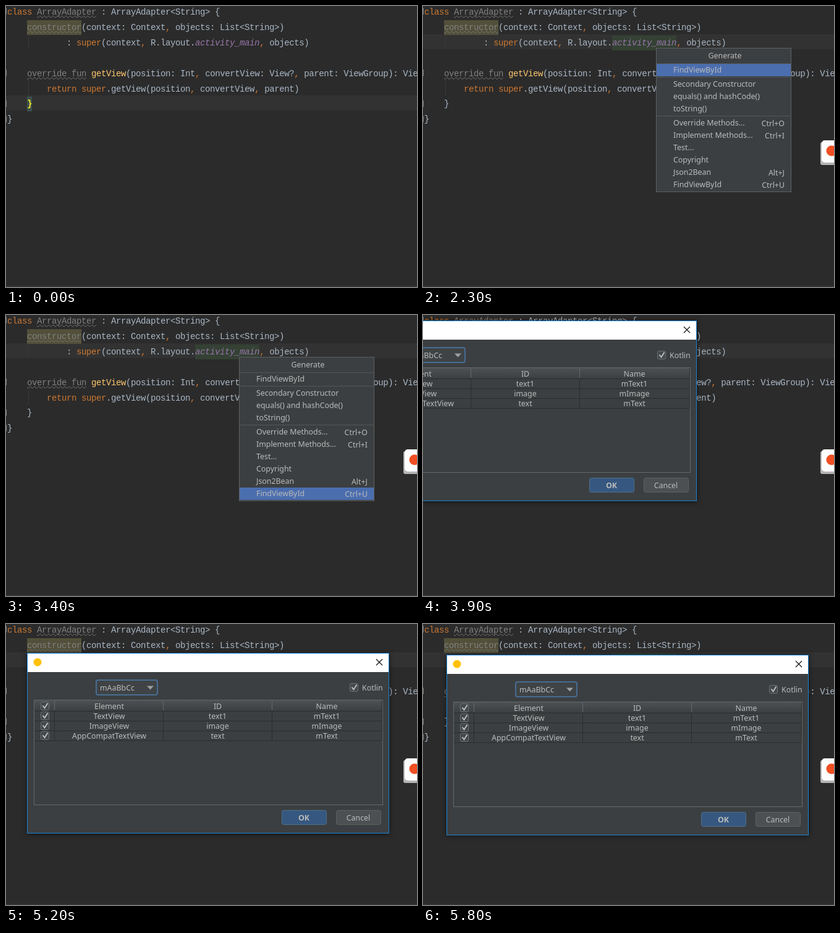
These frames come from a looping animation (665 px wide and 456 px high, 8000 ms). An HTML page:

```html
<!DOCTYPE html>
<html lang="en">
<head>
<meta charset="utf-8">
<title>Generate view bindings</title>
<style>
html, body { margin: 0; width: 665px; height: 456px; overflow: hidden; background: #2b2b2b; }
body { position: relative; }
#row { position: absolute; left: 0; width: 665px; height: 24px; background: #323232; }
pre {
  position: absolute; left: 2px; top: -2px; margin: 0; color: #a9b7c6;
  font: 14px/24.9px "Liberation Mono", monospace; letter-spacing: -.4px;
}
pre b { font-weight: 400; color: #cc7832; }
pre u { color: #808080; text-decoration: underline wavy #747474 1px; text-decoration-skip-ink: none; }
pre i { color: #9876aa; }
pre em { color: #ffc66d; font-style: normal; }
pre .warn, pre .use, pre .match { padding: 4px 0; }
pre .warn { background: #52503a; }
pre .use { background: #344134; }
pre .match { background: #3b514d; color: #ffef28; font-weight: 700; }
svg { position: absolute; left: 0; top: 0; }
svg text { font: 12.4px "Noto Sans", "Open Sans", sans-serif; fill: #bbb; }
#dialog { filter: drop-shadow(0 1px 4px #0008); }
</style>
</head>
<body>
<div id="row"></div>
<pre id="code"><b>class</b> <u>ArrayAdapter</u> : ArrayAdapter&lt;String&gt; {
    <u class="warn">constructor</u>(context: Context, objects: List&lt;String&gt;)
            : <b>super</b>(context, R.layout.<i id="layout">activity_main</i>, objects)

    <u>override fun</u> <em>getView</em>(position: Int, convertView: View?, parent: ViewGroup): View {
        <b>return super</b>.getView(position, convertView, parent)
    <span id="brace">}</span>
}</pre>
<svg id="ui" width="665" height="456"></svg>
<script>
const $ = id => document.getElementById(id);
const rect = (x, y, w, h, fill, more = '') =>
  `<rect x="${x}" y="${y}" width="${w}" height="${h}" fill="${fill}" ${more}/>`;
const frame = (x, y, w, h, fill, stroke, r = 0) =>
  rect(x + .5, y + .5, w - 1, h - 1, fill, `stroke="${stroke}" rx="${r}"`);
const line = (d, stroke, width = 1) =>
  `<path d="${d}" fill="none" stroke="${stroke}" stroke-width="${width}"/>`;
const text = (x, y, s, anchor = 'start', more = '') =>
  `<text x="${x}" y="${y}" text-anchor="${anchor}" ${more}>${s}</text>`;
const check = (x, y) => frame(x, y, 14, 14, '#43494a', '#6f7374', 2) +
  line(`M${x + 3.5} ${y + 6.5}l3 4 5-8`, '#c4c4c4', 1.8);

// Generate menu
const items = [
  [104, 'FindViewById'], [127, 'Secondary Constructor'], [147, 'equals() and hashCode()'],
  [167, 'toString()'], [190, 'Override Methods...', 'Ctrl+O'], [210, 'Implement Methods...', 'Ctrl+I'],
  [230, 'Test...'], [250, 'Copyright'], [270, 'Json2Bean', 'Alt+J'], [290, 'FindViewById', 'Ctrl+U']
];
const menu = frame(377, 68, 219, 234, '#3c3f41', '#5e6162') +
  text(488.5, 85, 'Generate', 'middle') +
  line('M378 93.5H595M378 115.5H595M378 178.5H595', '#535657') +
  rect(378, 94, 217, 20, '#4b6eaf', 'id="pick"') +
  items.map(([y, name, key = '']) =>
    text(405, y + 4, name) + text(585, y + 5, key, 'end')).join('');

// Field dialog
const columns = [171, 346.5, 523];
const rows = [
  ['Element', 'ID', 'Name'], ['TextView', 'text1', 'mText1'],
  ['ImageView', 'image', 'mImage'], ['AppCompatTextView', 'text', 'mText']
];
const table = frame(49, 126, 565, 171, '#3c3f41', '#66696a') +
  rect(50, 127, 562, 17, 'url(#head)') +
  line('M82.5 128V143M258.5 128V143M434.5 128V143', '#66696b') +
  line('M50 144.5H612M50 160.5H612M50 176.5H612M50 192.5H612' +
    'M82.5 145V192M258.5 145V192M434.5 145V192M612.5 127V192', '#2a2c2d') +
  rows.map((cells, i) => check(60, 129 + 16 * i) +
    cells.map((s, j) => text(columns[j], 141 + 16 * i, s, 'middle')).join('')).join('');
const dialog = frame(38, 50, 586, 293, '#3c3f41', '#1883d7') +
  rect(39, 51, 584, 30, '#fff') +
  '<circle cx="55" cy="65" r="6.5" fill="#ffc107"/>' +
  line('M603 60l10 10M613 60l-10 10', '#111', 1.2) +
  rect(150, 94, 99, 24, '#3f4345', 'stroke="#466d94" stroke-width="2" rx="3"') +
  text(156, 111, 'mAaBbCc') +
  '<path d="M232 103.500h11l-5.500 6z" fill="#9da0a1"/>' +
  check(560, 99) + text(580, 111, 'Kotlin') +
  table +
  frame(450, 305, 73, 24, '#365880', '#4c708c', 3) +
  text(486, 322, 'OK', 'middle', 'style="font-weight:700"') +
  frame(538, 305, 73, 24, '#4c5052', '#5e6060', 3) +
  text(574, 322, 'Cancel', 'middle');

$('ui').innerHTML = `
  <linearGradient id="head" x2="0" y2="1"><stop stop-color="#4d5153"/><stop offset="1" stop-color="#3c3f41"/></linearGradient>
  ${[3, 103, 153, 178].map(y => line(`M0 ${y}.5h.5v10H0`, '#858585')).join('')}
  ${line('M36.5 47V70M36.500 121V145', '#393939')}
  ${rect(0, 454, 665, 2, '#353334')}
  <g id="bulb"><circle cx="16" cy="51" r="4.500" fill="#e8c04f"/>${rect(14, 56, 4, 4, '#9a9a9a')}</g>
  ${rect(377, 45, 2, 24, '#bbb', 'id="caret"')}
  <g id="menu">${menu}</g>
  <g id="dialog">${dialog}</g>
  <g id="bar">${rect(643, 221, 30, 37, '#b5b5b5', 'rx="3"')}${rect(645, 218, 30, 36, '#fdfdfd', 'rx="5"')}
    <circle cx="661" cy="235" r="8.500" fill="#f04e23"/></g>`;
$('code').innerHTML = $('code').innerHTML.replace(/,/g, '<b>,</b>');

const picks = [[0, 0], [3000, 3], [3100, 6], [3200, 8], [3400, 9]];
const moves = [
  [0, -181, -41], [5000, -85, -20], [5100, -42, -10], [5200, -4, -3], [5300, 20, 0],
  [5400, 29, 0], [5500, 27, 0], [5600, 18, 0], [5700, 6, 0], [5800, 0, 0]
];
const held = (keys, t) => keys.findLast(k => k[0] <= t);
const show = (id, on) => $(id).style.display = on ? '' : 'none';

function draw() {
  const t = performance.now() % 8000;
  const clicked = t >= 900;
  $('row').style.top = (clicked ? 46 : 145) + 'px';
  $('brace').className = clicked ? '' : 'match';
  $('layout').className = t >= 1200 ? 'use' : '';
  show('bar', clicked);
  show('bulb', t >= 1700 && t < 2200);
  show('caret', t >= 1900 && t < 2200);
  show('menu', t >= 2200 && t < 3900);
  show('dialog', t >= 3900);
  $('pick').setAttribute('y', items[held(picks, t)[1]][0] - 10);
  const [, x, y] = held(moves, t);
  $('dialog').setAttribute('transform', `translate(${x} ${y})`);
  requestAnimationFrame(draw);
}
draw();
</script>
</body>
</html>
```
